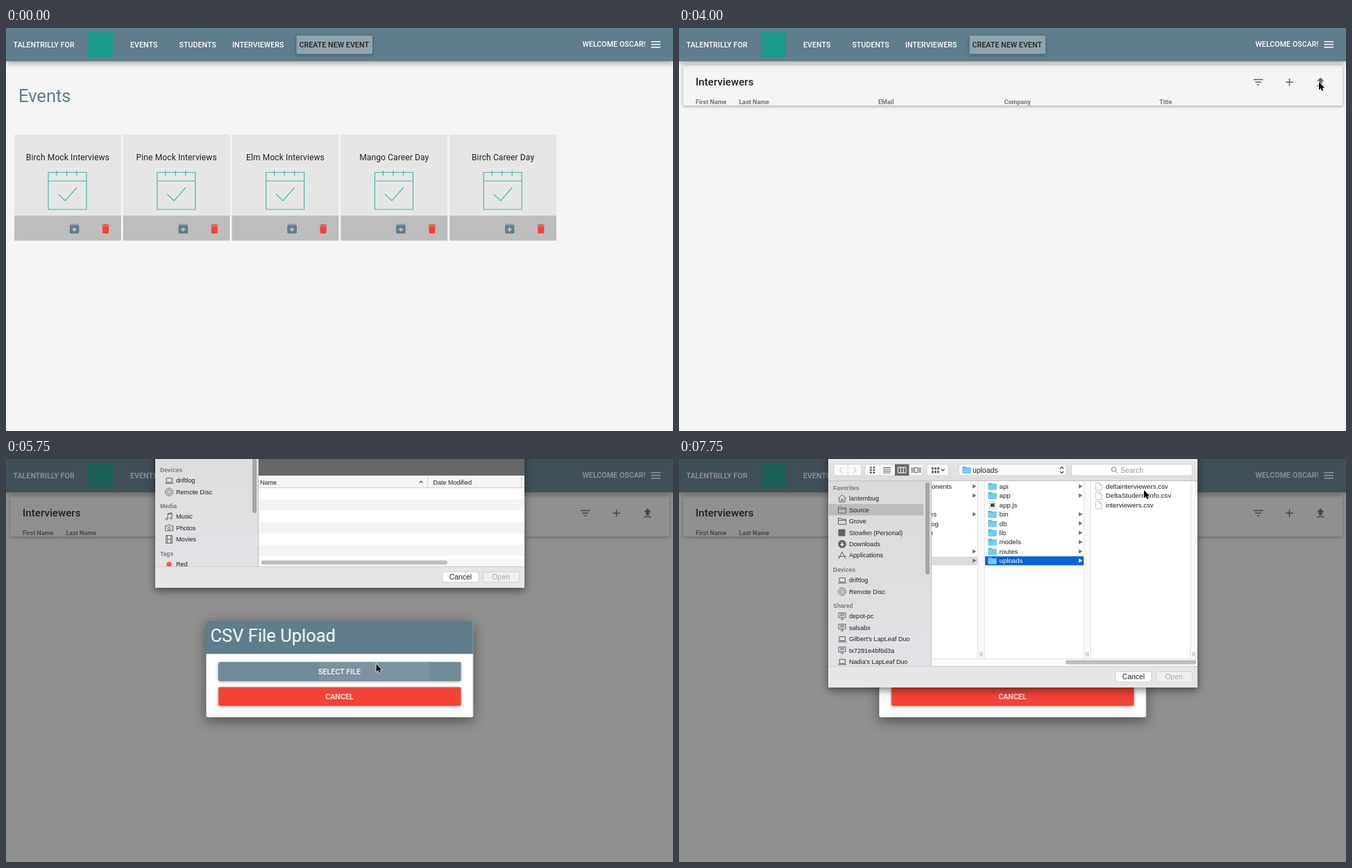
An HTML page for the animation above (8000 ms loop, 961x582 px).

```html
<!DOCTYPE html>
<html lang="en">
<head>
<meta charset="utf-8">
<title>Interview scheduler</title>
<style>
html, body { margin: 0; width: 100%; height: 100%; overflow: hidden; background: #f5f5f5; }
svg { display: block; }
text { font-family: Roboto, sans-serif; white-space: pre; }
.nav { font-size: 10.55px; font-weight: 500; letter-spacing: .01em; fill: #fff; }
.big { font-size: 25.5px; }
.card-name { font-size: 12px; letter-spacing: .01em; fill: #212121; text-anchor: middle; }
.heading { font-size: 15px; font-weight: 500; letter-spacing: .005em; fill: #212121; }
.col { font-size: 9px; font-weight: 700; fill: #757575; }
.mid { text-anchor: middle; }
.end { text-anchor: end; }
.line { fill: none; stroke: #4db6ac; stroke-width: 1.2; }
.low { filter: drop-shadow(0 1px 2px rgba(0,0,0,.35)); }
.high { filter: drop-shadow(0 5px 9px rgba(0,0,0,.45)); }
#panel text { font-family: "Liberation Sans", Arial, sans-serif; fill: #222; }
#panel .side { font-size: 9.1px; }
#panel .group { font-size: 8.5px; font-weight: 700; fill: #7a7a7a; }
#panel .file { font-size: 9.7px; }
#panel .ui { font-size: 10.4px; }
#panel .head { font-size: 9px; }
#panel .dim { fill: #aaa; }
.glyph { fill: none; stroke: #626262; stroke-width: 1; }

/* One tick is 250 ms = 3.125% */
.anim { animation: 8s step-end infinite; }
#events { animation-name: events; }
#people { animation-name: people; }
#navHover { animation-name: navHover; }
#navRipple { animation-name: navRipple; }
#iconRipple { animation-name: iconRipple; }
#shade { animation-name: shade; }
#dialog { animation-name: dialog; }
#pickHover { animation-name: pickHover; }
#pickRipple { animation-name: pickRipple; }
#panel { animation-name: panel; }
.early { animation-name: early; }
.late { animation-name: late; }
#cursor { animation-name: cursor; }

@keyframes events { 0% { opacity: 1 } 28.125%, 100% { opacity: 0 } }
@keyframes people { 0% { opacity: 0 } 28.125%, 100% { opacity: 1 } }
@keyframes navHover { 0% { opacity: 0 } 15.625% { opacity: 1 } 31.25%, 100% { opacity: 0 } }
@keyframes navRipple {
  0% { opacity: 0; r: 0 }
  25% { opacity: 1; r: 18px }
  28.125% { opacity: 1; r: 37px }
  31.25%, 100% { opacity: 0; r: 37px }
}
@keyframes iconRipple { 0% { opacity: 0 } 53.125% { opacity: 1 } 56.25%, 100% { opacity: 0 } }
@keyframes shade { 0% { opacity: 0 } 53.125%, 100% { opacity: 1 } }
@keyframes dialog {
  0% { opacity: 0; transform: translate(356px, 216px) scale(.898, .906) }
  53.125% { opacity: .92; transform: translate(356px, 216px) scale(.898, .906) }
  56.25%, 100% { opacity: 1; transform: translate(288.5px, 234px) }
}
@keyframes pickHover { 0% { opacity: 0 } 59.375%, 100% { opacity: 1 } }
@keyframes pickRipple {
  0% { opacity: 0; r: 0 }
  68.75% { opacity: 1; r: 40px }
  71.875% { opacity: 1; r: 80px }
  75%, 100% { opacity: 0; r: 80px }
}
@keyframes panel {
  0% { opacity: 0; transform: translateY(-144px) }
  71.875% { opacity: 1; transform: translateY(-144px) }
  75%, 100% { opacity: 1; transform: none }
}
@keyframes early { 0% { opacity: 1 } 75%, 100% { opacity: 0 } }
@keyframes late { 0% { opacity: 0 } 75%, 100% { opacity: 1 } }
@keyframes cursor {
  0% { opacity: 0; transform: translate(611px, 60px) }
  3.125% { opacity: 1; transform: translate(611px, 60px) }
  6.25% { opacity: 1; transform: translate(394.5px, 92px) }
  12.5% { transform: translate(382px, 62px) }
  15.625% { transform: translate(367px, 31px) }
  18.75% { transform: translate(364.5px, 28px) }
  31.25% { transform: translate(450px, 56px) }
  34.375% { transform: translate(690px, 80px) }
  37.5% { transform: translate(880px, 82px) }
  40.625% { transform: translate(920px, 79px) }
  43.75% { transform: translate(922px, 78px) }
  53.125% { transform: translate(813.5px, 91.5px) }
  56.25% { transform: translate(640px, 200px) }
  59.375% { transform: translate(548px, 291px) }
  62.5% { transform: translate(533.5px, 296px) }
  78.125% { transform: translate(544.5px, 262px) }
  81.25% { transform: translate(590px, 185px) }
  84.375% { transform: translate(645px, 95px) }
  87.5% { transform: translate(667px, 52px) }
  90.625%, 100% { opacity: 1; transform: translate(670px, 45px) }
}
</style>
</head>
<body>
<svg width="961" height="582" viewBox="0 0 961 582">
  <defs>
    <clipPath id="navClip"><rect x="321" y="11" width="85" height="27" rx="2"/></clipPath>
    <clipPath id="pickClip"><rect x="17.5" y="59.5" width="349.5" height="27" rx="2"/></clipPath>
    <linearGradient id="bar" x2="0" y2="1"><stop stop-color="#ebebeb"/><stop offset="1" stop-color="#dedede"/></linearGradient>
    <linearGradient id="sideFill" x2="0" y2="1"><stop stop-color="#dadada"/><stop offset="1" stop-color="#e1e2e5"/></linearGradient>
  </defs>
  <rect width="961" height="582" fill="#f5f5f5"/>

  <g id="events" class="anim">
    <text class="big" x="18" y="107" fill="#607d8b">Events</text>
    <g id="cards"></g>
  </g>

  <g id="people" class="anim">
    <rect class="low" x="6" y="54" width="950" height="58" rx="1.5" fill="#f5f5f5"/>
    <text class="heading" x="24" y="83">Interviewers</text>
    <g id="columns"></g>
    <circle id="iconRipple" class="anim" cx="924" cy="78" r="14.5" fill="rgba(0,0,0,.07)"/>
    <g id="tools"></g>
  </g>

  <rect width="961" height="48" fill="#607d8b" style="filter:drop-shadow(0 2px 4px rgba(0,0,0,.4))"/>
  <rect x="118" y="6" width="36" height="36" fill="#1a9b8c"/>
  <rect id="navHover" class="anim" x="321" y="11" width="85" height="27" rx="2" fill="rgba(158,158,158,.24)"/>
  <g clip-path="url(#navClip)"><circle id="navRipple" class="anim" cx="366" cy="25" fill="rgba(255,255,255,.06)"/></g>
  <rect class="low" x="418.5" y="11" width="109.5" height="26.5" rx="2" fill="#90a4ae"/>
  <g id="nav"></g>
  <path d="M929.5 19h13.5v1.6h-13.5zM929.5 23h13.5v1.6h-13.5zM929.5 27h13.5v1.6h-13.5z" fill="#fff"/>

  <rect id="shade" class="anim" width="961" height="582" fill="rgba(33,33,33,.48)"/>

  <g id="dialog" class="anim">
    <rect class="high" width="384.5" height="139" rx="3" fill="#fff"/>
    <path d="M0 47.500V3q0-3 3-3h378.500q3 0 3 3V47.500z" fill="#607d8b"/>
    <text class="big" x="6" y="30" fill="#fff">CSV File Upload</text>
    <rect class="low" x="17.5" y="59.500" width="349.5" height="27" rx="2" fill="#607d8b"/>
    <rect id="pickHover" class="anim" x="17.5" y="59.500" width="349.5" height="27" rx="2" fill="#708a96"/>
    <g clip-path="url(#pickClip)"><circle id="pickRipple" class="anim" cx="241.500" cy="73" fill="rgba(255,255,255,.08)"/></g>
    <rect class="low" x="17.5" y="95.500" width="349.5" height="27" rx="2" fill="#f44336"/>
    <text class="nav mid" x="192" y="77">SELECT FILE</text>
    <text class="nav mid" x="192" y="113">CANCEL</text>
  </g>

  <g id="panel" class="anim">
    <rect x="215" y="-10" width="532" height="340" fill="#e8e8e8" style="filter:drop-shadow(0 4px 6px rgba(0,0,0,.5))"/>
    <rect x="363" y="32" width="384" height="267" fill="#fff"/>
    <g id="listView" class="anim early"></g>
    <g id="columnView" class="anim late"></g>
    <rect x="215" y="32" width="148" height="267" fill="url(#sideFill)"/>
    <path d="M363.500 32V299" stroke="#c4c4c4"/>
    <g id="sidebar"></g>
    <rect x="215" y="299" width="532" height="31" fill="#e6e6e6"/>
    <path d="M215 299.500H747" stroke="#cfcfcf"/>
    <rect x="215" y="-10" width="532" height="42" fill="url(#bar)"/>
    <path d="M215 31.500H747" stroke="#c2c2c2"/>
    <g id="toolbar"></g>
  </g>

  <path id="cursor" class="anim" d="M0 0V11.500L2.700 9 4.600 13 6.400 12.200 4.600 8.400H8.200Z" stroke="#fff" stroke-width="1.4" paint-order="stroke"/>
</svg>
<script>
const fill = (id, html) => { document.getElementById(id).innerHTML = html; };
const text = (cls, x, y, s) => `<text class="${cls}" x="${x}" y="${y}">${s}</text>`;
const rect = (x, y, w, h, color, rx = 0, extra = '') =>
  `<rect x="${x}" y="${y}" width="${w}" height="${h}" rx="${rx}" fill="${color}" ${extra}/>`;
const icon = (d, cx, cy, color) =>
  `<path transform="translate(${cx - 9} ${cy - 9}) scale(.75)" d="${d}" fill="${color}"/>`;
const glyph = (x, y, d) => `<path class="glyph" transform="translate(${x} ${y})" d="${d}"/>`;

const ARCHIVE = 'M20.54 5.23l-1.39-1.68C18.88 3.21 18.47 3 18 3H6c-.47 0-.88.21-1.16.55L3.46 5.23C3.17 5.57 3 6.02 3 6.5V19c0 1.1.9 2 2 2h14c1.1 0 2-.9 2-2V6.5c0-.48-.17-.93-.46-1.27zM12 17.500L6.500 12H10v-2h4v2h3.500zM5.120 5l.81-1h12l.94 1z';
const TRASH = 'M6 19c0 1.100.9 2 2 2h8c1.100 0 2-.9 2-2V7H6zM19 4h-3.500l-1-1h-5l-1 1H5v2h14z';
const FILTER = 'M10 18h4v-2h-4zM3 6v2h18V6zm3 7h12v-2H6z';
const ADD = 'M19 13h-6v6h-2v-6H5v-2h6V5h2v6h6z';
const UPLOAD = 'M9 16h6v-6h4l-7-7-7 7h4zm-4 2h14v2H5z';

// Web page
const eventNames = ['Birch Mock Interviews', 'Pine Mock Interviews', 'Elm Mock Interviews', 'Mango Career Day', 'Birch Career Day'];
fill('cards', eventNames.map((name, i) => `<g transform="translate(${12 + i * 156.8} 154)">
  ${rect(0, 0, 153.8, 117.5, '#e6e6e6')}${rect(0, 117, 153.8, 36, '#bdbdbd')}
  ${text('card-name', 76.9, 36.5, name)}
  <path class="line" d="M49 54.500h55v53.500h-55zM49 67h55M61 52v7.500M75.500 52v7.500M90 52v7.500M63.500 86l10 9.500 16.500-19"/>
  ${icon(ARCHIVE, 86.5, 136, '#607d8b')}${icon(TRASH, 131.5, 136, '#f44336')}</g>`).join(''));

fill('nav', [[10.5, 'TALENTRILLY FOR'], [179, 'EVENTS'], [249.500, 'STUDENTS'], [326, 'INTERVIEWERS']]
  .map(([x, s]) => text('nav', x, 27.5, s)).join('')
  + '<text class="nav" x="422.5" y="27.500" style="fill:#212121">CREATE NEW EVENT</text>'
  + text('nav end', 921.5, 27, 'WELCOME OSCAR!'));

fill('columns', [[24, 'First Name'], [86.5, 'Last Name'], [287, 'EMail'], [468.5, 'Company'], [692, 'Title']]
  .map(([x, s]) => text('col', x, 110, s)).join(''));
fill('tools', [FILTER, ADD, UPLOAD].map((d, i) => icon(d, 834.7 + i * 44.8, 78.3, '#666')).join(''));

// File chooser
const GLYPHS = {
  home: 'M0 6L6 .500 12 6M2 5v6h3V7h2v4h3V5',
  folder: 'M.500 1.500h4l1 1.500h6v7.500h-11zM.500 4.500h11',
  disc: 'M6 .500a5.500 5.500 0 1 0 .01 0zM6 3a3 3 0 1 0 .01 0zM6 5.500v1',
  apps: 'M1 11L6 1l5 10M0 7.500h12',
  laptop: 'M2 2.500h8.500v6H2zM0 10h12.500',
  pc: 'M1 1h10v7H1zM4 10.500h4M6 8v2M3 3h6M3 5h6',
  note: 'M4 9.500V1.500l6-1v8M4 3l6-1M4 9.500a1.500 1.200 0 1 1-.01-.2M10 8.500a1.500 1.200 0 1 1-.01-.2',
  camera: 'M.500 3h3l1-1.500h3l1 1.500h3v7h-11zM6 4.500a2 2 0 1 0 .01 0',
  film: 'M1.500.500h9v11h-9zM3.500.500v11M8.500.500v11M3.500 6h5'
};
const solids = {
  square: y => rect(229.5, y - 5, 10, 10, '#626262'),
  down: y => `<circle cx="235" cy="${y}" r="5.800" fill="#626262"/><path d="M235 ${y - 3}v5.500m-2.500-2.500l2.500 2.500 2.500-2.500" fill="none" stroke="#eee" stroke-width="1.400"/>`,
  red: y => `<circle cx="235" cy="${y}" r="3.800" fill="#f4594c"/>`
};
const sideRow = ([kind, name], y) =>
  (solids[kind] ? solids[kind](y) : glyph(229, y - 6, GLYPHS[kind])) + text('side', 245, y + 3.2, name);
const section = (title, y, rows) =>
  text('group', 222, y + 3, title) + rows.map((r, i) => sideRow(r, y + 15.2 + i * 16.4)).join('');

fill('sidebar',
  rect(215.5, 65, 136.5, 16.500, '#bcbcbc')
  + section('Favorites', 42, [['home', 'lanternbug'], ['folder', 'Source'], ['folder', 'Grove'],
    ['square', 'Stowfen (Personal)'], ['down', 'Downloads'], ['apps', 'Applications']])
  + section('Devices', 160, [['laptop', 'driftlog'], ['disc', 'Remote Disc']])
  + '<g class="anim early">'
  + section('Media', 212, [['note', 'Music'], ['camera', 'Photos'], ['film', 'Movies']])
  + section('Tags', 281, [['red', 'Red']])
  + rect(355, 34, 6, 188, '#a6a6a6', 3) + '</g><g class="anim late">'
  + section('Shared', 212, [['pc', 'depot-pc'], ['pc', 'salsabx'], ['laptop', "Gilbert's LapLeaf Duo"],
    ['pc', 'tx7291e4bf6d3a'], ['laptop', "Nadia's LapLeaf Duo"]])
  + rect(355, 34, 6, 133, '#a6a6a6', 3) + '</g>');

let list = rect(364, 32, 383, 136, '#666') + rect(364, 168, 383, 18, '#f6f6f6');
for (let i = 0; i < 7; i++) list += rect(364, 186 + i * 16.4, 383, 16.4, i % 2 ? '#f3f4f6' : '#fff');
fill('listView', list
  + '<path d="M364 185.500H747M607.500 169v16M742.500 169v16" stroke="#d0d0d0"/>'
  + '<path d="M595.500 178.500l2.500-2.500 2.500 2.500" fill="none" stroke="#555" stroke-width="1.200"/>'
  + text('head', 366, 180.7, 'Name') + text('head', 615.5, 180.7, 'Date Modified')
  + rect(364, 288.500, 383, 11, '#f7f7f7') + rect(368, 290.500, 268, 6, '#bdbdbd', 3));

const rowY = i => 39.4 + i * 13.43;
const arrow = (x, y, color = '#777') => `<path d="M${x - 2.5} ${y - 3}l5.500 3-5.500 3z" fill="${color}"/>`;
const folder = (x, y) => `<path d="M${x} ${y - 5}h4.500l1 1.300h6.500v8.700h-12z" fill="#56b7e6"/>` + rect(x, y - 2.4, 12, 7.4, '#74cdf5', .8);
const page = (x, y) => `<path d="M${x} ${y - 5}h5.500l3 3v7.500h-8.500zM${x + 5.5} ${y - 5}v3h3" fill="#fff" stroke="#b5b5b5" stroke-width=".8"/>`;
const divider = x => rect(x, 32, 10.5, 256, '#f9f9f9')
  + `<path d="M${x + .5} 32v256M${x + 10} 32v256" stroke="#e2e2e2"/><path d="M${x + 4} 279v6M${x + 6.500} 279v6" stroke="#aaa"/>`;

const dirs = ['api', 'app', 'app.js', 'bin', 'db', 'lib', 'models', 'routes', 'uploads'];
const files = ['deltainterviewers.csv', 'DeltaStudentsInfo.csv', 'interviewers.csv'];
fill('columnView',
  rect(364, 141, 66, 12.500, '#dcdcdc')
  + [[0, 393, 'onents'], [3, 371, 'es'], [4, 374, 'og'], [5, 366, 'n']].map(([i, x, s]) => text('file end', x, rowY(i) + 3.4, s)).join('')
  + [0, 1, 3, 7, 8].map(i => arrow(425.5, rowY(i))).join('')
  + rect(441, 140.500, 142, 13, '#0a63d6')
  + dirs.map((name, i) => {
    const y = rowY(i), on = name === 'uploads', script = name === 'app.js';
    const mark = script ? page(447.5, y) + rect(449, y - 2, 5.500, 5, '#444') : folder(445.5, y);
    return mark + `<text class="file" x="461.500" y="${y + 3.4}"${on ? ' style="fill:#fff"' : ''}>${name}</text>`
      + (script ? '' : arrow(578.5, y, on ? '#fff' : '#777'));
  }).join('')
  + files.map((name, i) => page(600.5, rowY(i)) + text('file', 614.8, rowY(i) + 3.4, name)).join('')
  + divider(430) + divider(583) + divider(736.5)
  + rect(364, 288, 383, 11, '#fafafa') + '<path d="M364 288.500H747" stroke="#e2e2e2"/>'
  + rect(557, 290.500, 188, 6, '#bdbdbd', 3));

const button = (x, y, w, h, color = '#fafafa') => rect(x, y, w, h, color, 3, 'stroke="#cbcbcb" stroke-width=".8"');
let grid = '';
for (let i = 0; i < 6; i++) grid += rect(275 + i % 2 * 4.5, 11.500 + (i >> 1) * 3.5, 2.800, 2.200, '#555');
for (let i = 0; i < 6; i++) grid += rect(364 + i % 3 * 4, 12 + (i >> 1 > 0 && i > 2 ? 5 : 0), 2.800, 3.500, '#666');
fill('toolbar',
  button(223, 7.5, 40, 16.5) + button(268, 7.5, 83, 16.5) + button(357, 7.5, 31.5, 16.5)
  + button(403, 7.5, 155, 16.5) + button(565.5, 7.5, 174, 16.5, '#fff')
  + rect(311, 7.5, 20.5, 16.5, '#686868')
  + '<path d="M243.500 8v16M289.500 8v16" stroke="#ddd"/>'
  + '<path d="M235 12l-3.500 4 3.500 4M251.500 12l3.500 4-3.500 4" fill="none" stroke="#bbb"/>'
  + grid
  + glyph(294, 10, 'M0 2.500h11M0 5h11M0 7.500h11M0 10h11')
  + '<path d="M315.500 12h11.500v8h-11.500zM319.300 12v8M323.200 12v8" fill="none" stroke="#fff"/>'
  + glyph(335, 10, 'M.500 2v8M2.500 2v8M4.500 2.500h4.500v7h-4.500zM11 2v8M13 2v8')
  + '<path d="M377.500 14.500l2.500 2.500 2.500-2.500M549 14l2.500-2.500 2.500 2.500M549 18l2.500 2.500 2.500-2.500" fill="none" stroke="#444" stroke-width="1.200"/>'
  + folder(408.5, 16) + text('ui', 423, 19.7, 'uploads')
  + '<circle cx="626.500" cy="15" r="3.200" fill="none" stroke="#777"/><path d="M629 17.500l3 3" stroke="#777"/>'
  + '<text class="ui" x="636" y="19.700" style="fill:#999">Search</text>'
  + button(629, 307, 52, 15, '#fff') + button(687.5, 307, 52, 15, '#f0f0f0')
  + text('ui mid', 655, 318.4, 'Cancel') + text('ui mid dim', 713, 318.4, 'Open'));
</script>
</body>
</html>
```
